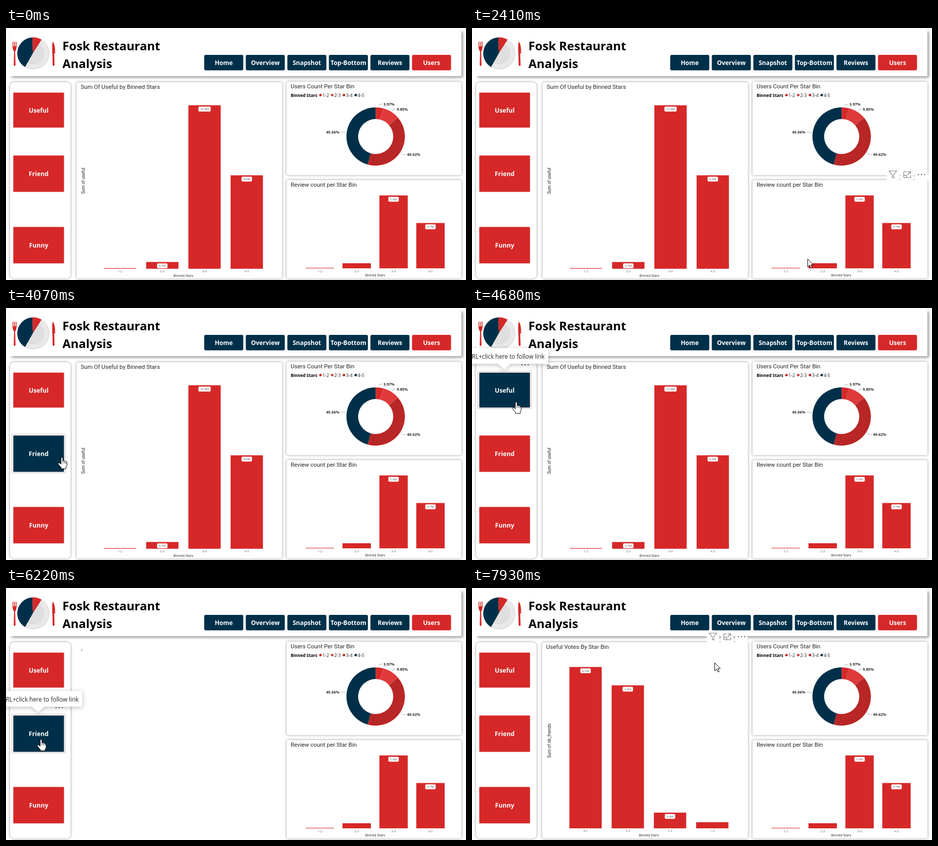
Write an HTML page that moves like this. It is 905 px wide and 497 px high and loops after 7.99 s.

```html
<!DOCTYPE html>
<html lang="en">
<head>
<meta charset="utf-8">
<title>Restaurant dashboard</title>
<style>
  html, body { margin: 0; width: 100%; height: 100%; overflow: hidden; background: #fff; }
  svg { display: block; }
  text { font-family: "Open Sans", "Noto Sans", sans-serif; }
  .din { font-family: Roboto, "Liberation Sans", sans-serif; }
  .panel { fill: #fff; filter: drop-shadow(0.5px 0.5px 2.5px rgba(0,0,0,.42)); }
  .head { fill: #fff; filter: drop-shadow(3px 3px 2.5px rgba(0,0,0,.38)); }
  .tip { fill: #fff; filter: drop-shadow(0 2px 5px rgba(0,0,0,.25)); }
</style>
</head>
<body>
<svg id="stage" width="905" height="497" viewBox="0 0 905 497"></svg>
<script>
const LOOP = 7990;
const RED = '#d62828', NAVY = '#003049', INK = '#252423', GREY = '#605e5c';
const stage = document.getElementById('stage');

const attrs = o => Object.entries(o).map(([k, v]) => ` ${k}="${v}"`).join('');
const rect = (x, y, w, h, o = {}) => `<rect${attrs({ x, y, width: w, height: h, ...o })}/>`;
const path = (d, o = {}) => `<path${attrs({ d, ...o })}/>`;
const text = (s, x, y, size, o = {}) => `<text${attrs({ x, y, 'font-size': size, fill: INK, ...o })}>${s}</text>`;
const mid = { 'text-anchor': 'middle' };
const group = (id, body, o = {}) => `<g${attrs({ id, ...o })}>${body}</g>`;
const box = (x, y, x2, y2, r) => rect(x, y, x2 - x, y2 - y, { rx: r, class: 'panel' });

// Header
function logo() {
  const tines = [13.6, 16.8, 20].map(x => path(`M${x} 27V38`, { stroke: RED, 'stroke-width': 1.5 })).join('');
  const fork = tines + path('M13 36H20.7Q20.5 44 18 46L18.8 73Q17 77 15.2 73L15.9 46Q13 44 13 36Z', { fill: RED });
  const knife = path('M92 26.5Q97 32 96.6 50H94.8L95.6 73Q93.8 77 91.8 73L91.2 50Q90 36 92 26.5Z', { fill: RED });
  const plate = '<circle cx="54" cy="50" r="31.5" fill="#d6d6d6"/><circle cx="54" cy="49.5" r="30.5" fill="#e9e9e9"/>' +
    '<circle cx="54.5" cy="50.5" r="20.5" fill="#d3d3d3"/><circle cx="55" cy="51.2" r="19.5" fill="#dfdfdf"/>';
  const pie = path('M53 49.5L37.5 77A31.5 31.5 0 0 1 52 18.5Z', { fill: NAVY }) +
    path('M53 49.5L52 18.5A31.5 31.5 0 0 1 70 23Z', { fill: RED });
  return fork + knife + plate + pie;
}

function header() {
  const names = ['Home', 'Overview', 'Snapshot', 'Top-Bottom', 'Reviews', 'Users'];
  const nav = names.map((s, i) => {
    const x = 390 + i * 81.75;
    return rect(x, 53, 76.8, 30.5, { rx: 3, fill: i === 5 ? RED : NAVY }) +
      text(s, x + 38.4, 73, 12, { ...mid, fill: '#fff', 'font-weight': 700 });
  }).join('');
  const title = { fill: '#000', 'font-weight': 700 };
  return rect(8, 4, 888, 91, { class: 'head' }) + logo() +
    text('Fosk Restaurant', 111, 44, 23.7, title) + text('Analysis', 111, 79, 23.7, title) + nav;
}

// Charts; each bar is [category, top, data label]
function bars(list, x0, step, w, base, axisY, titleY) {
  const body = list.map(([cat, top, label], i) => {
    const x = x0 + i * step, c = x + w / 2, lw = label.length > 4 ? 24 : 20.5;
    const pill = label && rect(c - lw / 2, top + 2.7, lw, 9.6, { rx: 2, fill: '#fff' }) +
      text(label, c, top + 9.8, 6, { ...mid, fill: GREY });
    return rect(x, top, w, base - top, { fill: RED }) + pill +
      text(cat, c, axisY, 6, { ...mid, fill: GREY });
  }).join('');
  return body + text('Binned Stars', x0 + step * 1.5 + w / 2, titleY, 6.6, mid);
}

const title = (s, x, y) => text(s, x, y, 11.5, { class: 'din' });
const sideways = (s, y) => text(s, 0, 0, 8.4, { ...mid, class: 'din', transform: `translate(155 ${y}) rotate(-90)` });

const usefulChart = () => box(139, 107, 543, 494, 4) + title('Sum Of Useful by Binned Stars', 147, 120) +
  sideways('Sum of useful', 301.5) +
  bars([['1-2', 473.6, ''], ['2-3', 461.5, '0.7M'], ['3-4', 152.4, '16.8M'], ['4-5', 290.5, '9.6M']],
    192.6, 83.1, 63.6, 474.8, 481.5, 491);

const friendChart = () => box(138, 107, 543, 494, 4) + title('Useful Votes By Star Bin', 146, 120) +
  sideways('Sum of nb_friends', 301) +
  bars([['4-5', 155.8, '8.3M'], ['3-4', 192, '7.4M'], ['2-3', 443, '0.8M'], ['1-2', 462, '']],
    191.6, 83.1, 63.6, 474, 480.8, 490);

const reviewChart = () => box(552, 300, 896, 494, 4) + title('Review count per Star Bin', 560, 313) +
  bars([['1-2', 473, ''], ['2-3', 464, ''], ['3-4', 330.2, '7.6M'], ['4-5', 384.6, '4.7M']],
    589.4, 72.6, 55.8, 474, 482, 490);

function donut() {
  const shares = [[3.97, RED], [9.85, '#de3a3a'], [40.62, '#b92626'], [45.56, NAVY]];
  const at = (p, r) => {
    const a = p * Math.PI / 50;
    return `${(727.3 + r * Math.sin(a)).toFixed(2)} ${(214 - r * Math.cos(a)).toFixed(2)}`;
  };
  let p = 0;
  const ring = shares.map(([v, fill]) => {
    const a = p, b = p += v;
    return path(`M${at(a, 57.5)}A57.5 57.5 0 0 1 ${at(b, 57.5)}L${at(b, 34.5)}A34.5 34.5 0 0 0 ${at(a, 34.5)}Z`, { fill });
  }).join('');
  const legend = shares.map(([, fill], i) => {
    const x = 618.7 + i * 23.1;
    return `<circle cx="${x}" cy="132.3" r="2.5" fill="${fill}"/>` + text(`${i + 1}-${i + 2}`, x + 3.9, 135.8, 8.9);
  }).join('');
  const lines = path('M734.5 155V150.5H741M759 165L762 160.5H767M669 206L667 205.5H658M777 245L780 249.5H787',
    { fill: 'none', stroke: '#a6a6a6', 'stroke-width': 0.8 });
  const labels = [['3.97%', 742.5, 153], ['9.85%', 768.8, 163], ['40.62%', 789, 252], ['45.56%', 629.8, 208]]
    .map(([s, x, y]) => text(s, x, y, 7.5, { 'font-weight': 700 })).join('');
  return box(552, 106, 896, 290, 4) + title('Users Count Per Star Bin', 560, 119) +
    text('Binned Stars', 560, 135.8, 8.3, { 'font-weight': 700, fill: '#000' }) + legend + ring + lines + labels;
}

// Left menu
const buttons = [['Useful', 127.3, 196.5], ['Friend', 251.3, 323.3], ['Funny', 392.3, 464.3]];
const menu = () => box(8, 107, 127, 494, 8) + buttons.map(([s, a, b], i) =>
  rect(11.5, a - 2.5, 105, b - a + 4.5, { id: 'ring' + i, fill: 'none', stroke: '#c8c6c4' }) +
  rect(14.2, a, 100, b - a, { id: 'btn' + i, rx: 1.5, fill: RED, stroke: '#efb3b3', 'stroke-width': 0.5 }) +
  text(s, 64.3, (a + b) / 2 + 4.8, 12.2, { ...mid, fill: '#fff', 'font-weight': 700 })).join('');

const dots = (x, y, gap, r) => [-1, 0, 1].map(i => `<circle cx="${x + i * gap}" cy="${y}" r="${r}" fill="${GREY}"/>`).join('');

const linkTip = () => dots(104.5, 112, 6, 1.2) +
  path('M-12 79H148Q150 79 150 81V108Q150 110 148 110H76L63.5 121L51 110H-12Z', { class: 'tip' }) +
  text('CTRL+click here to follow link', 143, 100.3, 11.7, { 'text-anchor': 'end' });

function tools() {
  const line = { fill: 'none', stroke: '#7a7876', 'stroke-width': 1.1 };
  return [462, 490, 518].map(x => rect(x, 84, 24, 23, { fill: '#fff' })).join('') +
    path('M466.5 89H481.5L475.8 96V103L472.6 101V96Z', line) +
    path('M501 90.5H495.5V102H509V97M503 90.5H509V95M509 90.5L502.5 96.5M495.5 97.5H501V102', line) +
    dots(530.5, 96, 6, 1.2);
}

function barTip() {
  const row = (k, v, y) => text(k, 503.5, y, 11.2, { 'text-anchor': 'end', fill: '#cfcdcb' }) +
    text(v, 515, y, 11.2, { fill: '#fff', 'font-weight': 700 });
  return path('M415 353H583V421H415V414L407.5 407L415 400Z', { fill: '#32302e', opacity: 0.94 }) +
    row('Binned Stars', '3-4', 383) + row('Sum of useful', '16783525', 401);
}

const outline = { fill: '#fff', stroke: '#000', 'stroke-width': 1, 'stroke-linejoin': 'round' };
const arrow = () => path('M.5 .5V16.3L4.2 12.8L6.8 18.7L9.2 17.6L6.7 11.9H11.6Z', outline);
const hand = () => path('M-1.8 14V2Q-1.8 .5 0 .5Q1.8 .5 1.8 2V7.5Q3.6 6 5 8.2Q7 7 8 9.4Q10 9 10 11.5V15' +
  'Q10 18 8 20V23H-1.5V20.5Q-5 17 -7.3 13.6Q-8 11.5 -5.8 11.3Q-4.3 11.6 -1.8 14Z', outline) +
  path('M1.8 8V12M5 9V12.5M8 10V13', { stroke: '#000', 'stroke-width': 0.8 });

stage.innerHTML = header() + menu() +
  group('useful', usefulChart()) + group('friend', friendChart()) +
  '<circle id="loader" cx="149" cy="122.8" r="1.4" fill="#a09c90"/>' +
  donut() + reviewChart() +
  group('tools', tools()) + group('tools2', tools(), { transform: 'translate(354 193)' }) +
  group('barTip', barTip()) + group('linkTip', linkTip()) +
  group('arrow', arrow()) + group('hand', hand());

const el = {};
stage.querySelectorAll('[id]').forEach(n => el[n.id] = n);
const show = (id, on) => el[id].setAttribute('visibility', on ? 'visible' : 'hidden');

// Pointer moves: start, end, steps, x, y
const moves = [
  [1060, 1200, 3, 387, 407], [1860, 2080, 4, 700, 455], [2340, 2830, 8, 541, 456],
  [3030, 3240, 4, 326, 417], [3390, 3870, 8, 118, 330], [4070, 4270, 4, 87, 185],
  [5080, 5350, 5, 76, 283], [5550, 5890, 5, 69, 287], [6220, 6220, 1, 69, 298],
  [6290, 6640, 6, 69, 306], [7140, 7660, 9, 228, 353], [7860, 7930, 2, 477, 147]
];

// Share of a stepped change done; the first step lands at its start
function done(t, a, b, n) {
  if (t < a) return 0;
  if (t >= b) return 1;
  return (Math.floor((t - a) / (b - a) * (n - 1)) + 1) / n;
}

function pointer(t) {
  let x = 475, y = 500;
  for (const [a, b, n, tx, ty] of moves) {
    const k = done(t, a, b, n);
    x += (tx - x) * k;
    y += (ty - y) * k;
  }
  return [Math.round(x), Math.round(y)];
}

function draw(t) {
  const [x, y] = pointer(t);
  const over = buttons.findIndex(([, a, b]) => x > 14 && x < 114 && y > a && y < b);
  const inside = (x1, y1, x2, y2) => t >= 1060 && x >= x1 && x <= x2 && y >= y1 && y <= y2;

  buttons.forEach((_, i) => {
    const hot = over === i;
    show('ring' + i, hot);
    el['btn' + i].setAttribute('fill', hot && !(i === 1 && t >= 6430) ? NAVY : RED);
  });

  show('useful', t < 6220);
  show('loader', t >= 6220 && t < 6430);
  show('friend', t >= 6430);
  show('tools', inside(139, 107, 543, 494));
  show('tools2', inside(552, 300, 896, 494));
  show('barTip', t >= 1790 && t < 1860);

  const first = t < 5080;
  const tip = first ? done(t, 4540, 4680, 3) : done(t, 5750, 5890, 3);
  show('linkTip', tip > 0 && t < 7140);
  el.linkTip.setAttribute('opacity', tip);
  el.linkTip.setAttribute('transform', `translate(0 ${first ? 0 : 124})`);

  show('arrow', t >= 1060 && over < 0);
  show('hand', over >= 0);
  for (const id of ['arrow', 'hand']) el[id].setAttribute('transform', `translate(${x} ${y})`);
}

const start = performance.now();
function tick() {
  draw((performance.now() - start) % LOOP);
  requestAnimationFrame(tick);
}
tick();
</script>
</body>
</html>
```
